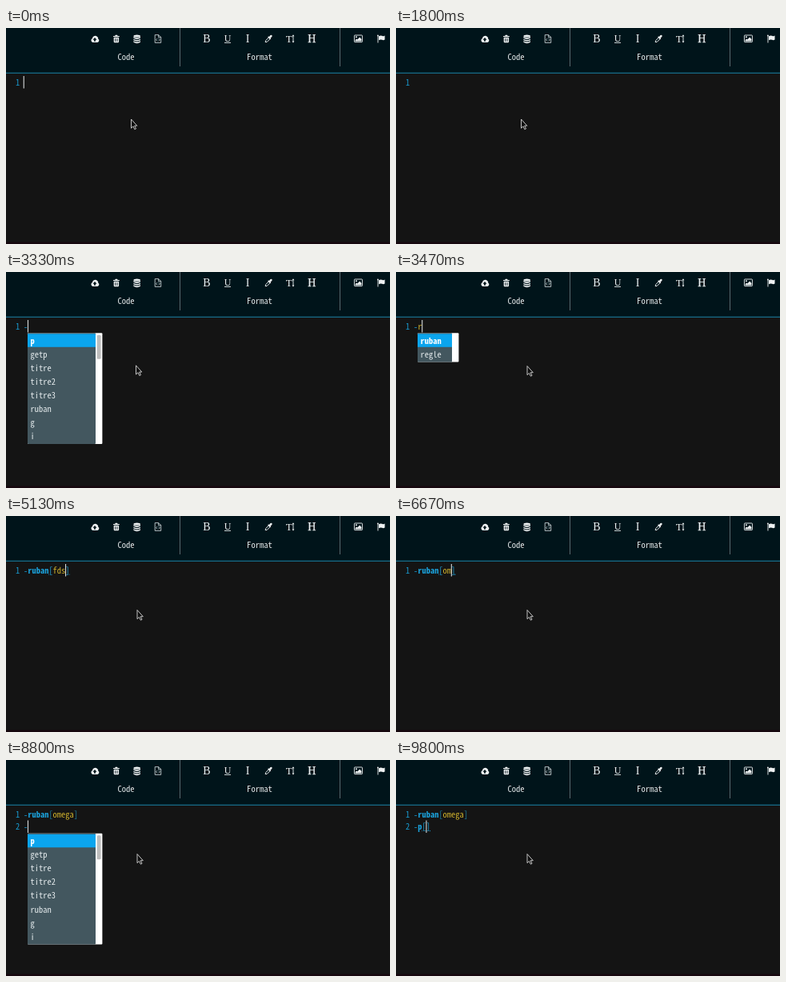
Recreate the animation shown at these times as an HTML page. Size 480 by 270 pixels, loop 9990 ms.

```html
<!DOCTYPE html>
<html lang="fr">
<head>
<meta charset="utf-8">
<style>
html, body { margin: 0; width: 100%; height: 100%; overflow: hidden; background: #141414; }
svg { display: block; width: 100vw; height: 100vh; }
.mono { font: 10.46px "Noto Sans Mono CJK JP", "Noto Sans Mono", monospace; }
.label { font-size: 10.6px; fill: #e4e8e9; text-anchor: middle; }
.serif { font: 14px "Liberation Serif", serif; fill: #eef1f2; text-anchor: middle; }
.num, .dash { fill: #189bd0; }
.tag { fill: #1ba2dc; font-weight: bold; }
.arg { fill: #cdb02c; }
.br { fill: #1b7fa0; }
.br.on { fill: #20a5dc; text-decoration: underline; }
.item { fill: #e6ecee; }
.item.sel { fill: #fff; font-weight: bold; }
</style>
</head>
<body>
<svg viewBox="0 0 480 270">
  <rect width="480" height="270" fill="#141414"/>
  <rect y="267.5" width="480" height="2.5" fill="#16070e"/>
  <rect width="480" height="56" fill="#00141a"/>
  <rect y="55.7" width="480" height="1.2" fill="#18708f"/>
  <path d="M217.5 0V48M417.5 0V48" stroke="#5b686d"/>
  <g class="mono">
    <text class="label" x="150" y="40.3">Code</text>
    <text class="label" x="317" y="40.3">Format</text>
  </g>

  <g fill="#eef1f2">
    <path d="M108.6 18a2.7 2.7 0 0 1-.6-5.1 3.4 3.4 0 0 1 6.1-1.8 2 2 0 0 1 1 2.4 2.4 2.4 0 0 1-.8 4.5z"/>
    <path d="M111 12l2.6 2.8h-1.7v2h-1.8v-2h-1.7z" fill="#00141a"/>
    <path d="M134 10h2.2l.5-1.2h2.4l.5 1.2h2.2v1.1H134zM134.7 11.7h6.4v5.4q0 1.2-1.1 1.2h-4.2q-1.1 0-1.1-1.2z"/>
    <path d="M136.4 13v4M137.9 13v4M139.4 13v4" stroke="#00141a" stroke-width=".6"/>
    <ellipse cx="163.7" cy="10" rx="4.3" ry="1.6"/>
    <path id="disc" d="M159.4 11.1q4.3 2.4 8.6 0v1.5q-4.3 2.7-8.6 0z"/>
    <use href="#disc" y="2.6"/>
    <use href="#disc" y="5.2"/>
    <path d="M186.2 8.6h4.6l2.9 2.9v6.9h-7.5zM190.6 8.8v2.9h3M188.9 13.2l-1.2 1.5 1.2 1.5M191 13.2l1.2 1.5-1.2 1.5" fill="none" stroke="#dfe4e6" stroke-width=".8"/>
    <path d="M324.2 17.7l.4-2 3.7-3.7 1.7 1.7-3.7 3.7z" fill="none" stroke="#eef1f2" stroke-width="1"/>
    <path d="M327.2 11.2l1-1 .8.7 1.2-1.6q1.1-1.2 2.1-.2t-.2 2.1l-1.5 1.3.6.8-1 1z"/>
    <path d="M359 9.3v8.3" stroke="#eef1f2" stroke-width=".9"/>
    <path d="M359 8.2l1.4 2h-2.8zM359 18.5l1.4-2h-2.8z"/>
    <rect x="435.4" y="9" width="10" height="8.6" rx=".7" fill="none" stroke="#eef1f2" stroke-width=".9"/>
    <circle cx="437.9" cy="11.3" r="1"/>
    <path d="M436.5 16.5v-1.3l1.7-1.7 1 1 2.9-2.9 2.3 2.3v2.6z"/>
    <circle cx="464.9" cy="9.4" r=".9"/>
    <path d="M464.5 9.5h.9v9h-.9zM466 10.2q2.2-1.4 4 -.4t3.5-.4v5.2q-1.8 1.2-3.5.2t-4 .5z"/>
  </g>
  <text class="serif" x="251" y="18" font-weight="bold">B</text>
  <text class="serif" x="277" y="16.6" style="font-size:12px">U</text>
  <path d="M273 18.4h8" stroke="#eef1f2" stroke-width=".9"/>
  <text class="serif" x="302" y="18" font-style="italic" font-weight="bold">I</text>
  <text class="serif" x="353.8" y="18" style="font-size:13px">T</text>
  <text class="serif" x="382.3" y="18" stroke="#eef1f2" stroke-width=".25">H</text>

  <g id="lines" class="mono"></g>
  <g id="menu" class="mono"></g>
  <rect id="caret" width="1.1" height="15.5" fill="#d5d8d9"/>
  <path id="mouse" d="M.5.5v11.2l2.5-2.3 1.8 3.8 1.7-.8-1.8-3.7h3.1z" fill="#101010" stroke="#d6d6d6" stroke-width=".9" stroke-linejoin="round"/>
</svg>
<script>
const LOOP = 9990, BLINK = 533, LEFT = 22, ADV = 5.23, PITCH = 15.5, ROW = 17.1;
const ALL = ['p', 'getp', 'titre', 'titre2', 'titre3', 'ruban', 'g', 'i'];
const SOME = ['ruban', 'regle'];
const DONE = '-ruban[omega]\n';

// [time, text with "|" as the caret, suggestions]; each entry restarts the blink
const EDITS = [
  [-203, '|'],
  [2130, '-|', ALL],
  [3470, '-r|', SOME],
  [3600, '-ru|', SOME],
  [4270, '-ruban[|]'],
  [5000, '-ruban[fd|]'],
  [5130, '-ruban[fds|]'],
  [5730, '-ruban[fd|]'],
  [5800, '-ruban[f|]'],
  [5870, '-ruban[|]'],
  [6270, '-ruban[o|]'],
  [6670, '-ruban[om|]'],
  [6800, '-ruban[ome|]'],
  [7130, '-ruban[omeg|]'],
  [7200, '-ruban[omega|]'],
  [7270, '-ruban[omega|]'],
  [7800, '-ruban[omega]|'],
  [8130, DONE + '|'],
  [8800, DONE + '-|', ALL],
  [9330, DONE + '-p[|]'],
  [9800, DONE + '-p[|]']
];
const MOVES = [[0, 156, 113.5], [3270, 159, 115], [3330, 162, 116.3], [3400, 163.5, 117]];

const $ = id => document.getElementById(id);
const last = (list, t) => list.filter(e => e[0] <= t).pop();
const span = (cls, s) => s ? `<tspan class="${cls}">${s}</tspan>` : '';
const rect = (x, y, w, h, fill, r = 0) =>
  `<rect x="${x}" y="${y}" width="${w}" height="${h}" rx="${r}" fill="${fill}"/>`;

function lineSvg(src, i) {
  const y = 71.6 + i * PITCH;
  const br = src.includes('|') ? 'br on' : 'br';
  const [, dash, word, open, arg, close] =
    src.replace('|', '').match(/^(-?)(\w*)(\[?)(\w*)(\]?)$/);
  return `<text class="num" x="12" y="${y}">${i + 1}</text><text x="${LEFT}" y="${y}">` +
    span('dash', dash) + span(open ? 'tag' : 'arg', word) +
    span(br, open) + span('arg', arg) + span(br, close) + '</text>';
}

function menuSvg(items, row) {
  const top = 76.3 + row * PITCH, h = items.length * ROW + 2;
  const long = items.length > 2, w = long ? 85 : 43;
  let s = rect(27, top, w + 8.4, h, '#fff', 1) + rect(27, top, w, h, '#43575f', 1) +
    rect(27, top + 1, w, ROW - .6, '#0ba5ee');
  if (long) s += rect(113.7, top + 2.5, 5, 30, '#bdbdbd', 1.5);
  items.forEach((name, i) => {
    s += `<text class="item${i ? '' : ' sel'}" x="30.5" y="${top + 13.2 + i * ROW}">${name}</text>`;
  });
  return s;
}

let shown;
function draw(t) {
  const edit = last(EDITS, t);
  const [start, text, items] = edit;
  const rows = text.split('\n'), row = rows.length - 1;
  if (edit !== shown) {
    shown = edit;
    $('lines').innerHTML = rows.map(lineSvg).join('');
    $('menu').innerHTML = items ? menuSvg(items, row) : '';
    $('caret').setAttribute('x', LEFT - .3 + rows[row].indexOf('|') * ADV);
    $('caret').setAttribute('y', 60 + row * PITCH);
  }
  const on = Math.floor((t - start) / BLINK) % 2 === 0;
  $('caret').setAttribute('visibility', on ? 'visible' : 'hidden');
  const [, x, y] = last(MOVES, t);
  $('mouse').setAttribute('transform', `translate(${x} ${y})`);
}

const t0 = performance.now();
function tick() {
  draw((performance.now() - t0) % LOOP);
  requestAnimationFrame(tick);
}
tick();
</script>
</body>
</html>
```
